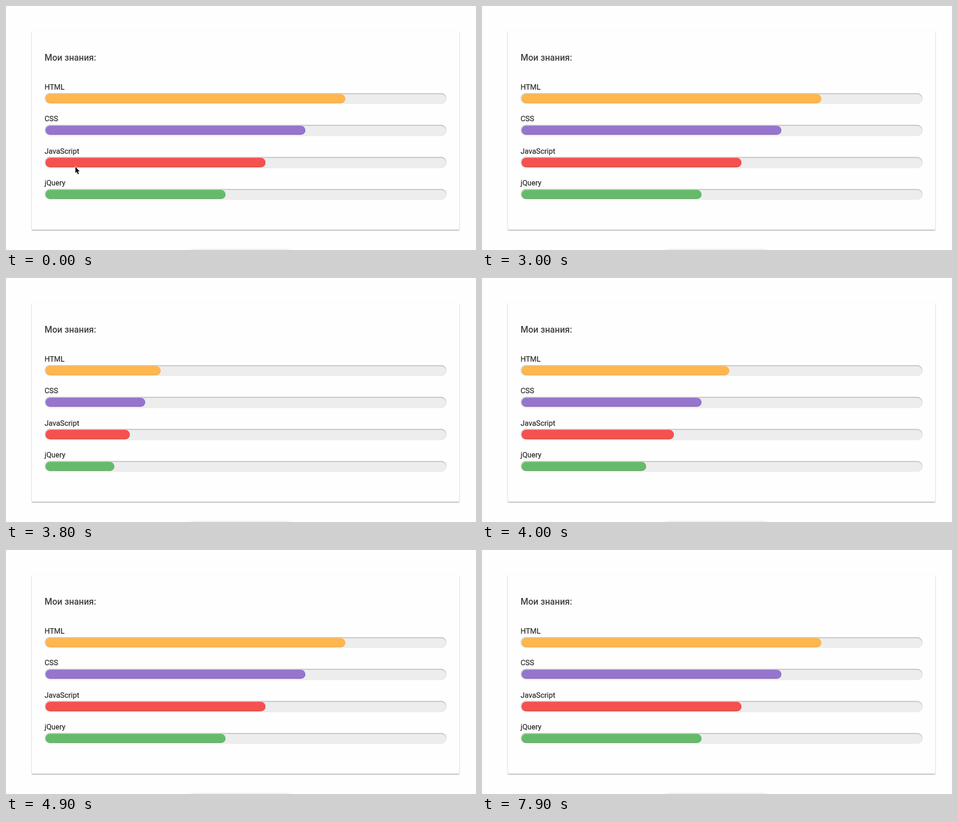
Recreate the animation shown at these times as an HTML page. Size 1036x540 px, loop 8 s.

```html
<!DOCTYPE html>
<html lang="ru">
<head>
<meta charset="utf-8">
<title>Мои знания</title>
<style>
  html, body { margin: 0; width: 100%; height: 100%; overflow: hidden; background: #fefefe; }
  body { position: relative; font-family: Roboto, sans-serif; color: #2b2b2b; }
  body *, .track { position: absolute; box-sizing: border-box; }
  .card {
    left: 57px; top: 55px; width: 942px; height: 440px; background: #fefefe;
    box-shadow: 0 1px 3px rgba(0,0,0,.12), 0 1.5px 2px rgba(0,0,0,.24);
  }
  h1 { left: 85px; top: 103px; margin: 0; font-size: 19.4px; line-height: 24px; font-weight: 500; color: #424242; white-space: nowrap; }
  .track {
    left: 85px; width: 886px; height: 24.5px; border-radius: 12.25px; background: #ededed;
    box-shadow: inset 0 1.5px 2px rgba(0,0,0,.25);
  }
  .label {
    left: 0; top: -24.6px; font-size: 16.3px; line-height: 24px; white-space: nowrap;
    -webkit-text-stroke: .25px #2b2b2b;
  }
  .fill {
    left: 1.5px; top: 1.75px; height: 20.5px; border-radius: 10.25px;
    box-shadow: inset 0 -1px 1px rgba(0,0,0,.15);
  }
  .pill { left: 393px; top: 537px; width: 249px; height: 44px; border-radius: 22px; background: #f3f3f3; }
  #cursor { left: 150px; top: 352px; }
</style>
</head>
<body>
<div class="card"></div>
<h1>Мои знания:</h1>
<div class="pill"></div>
<svg id="cursor" width="16" height="26" viewBox="150 352 16 26">
  <path d="M153 355.7V369.6L156 366.8L158.3 372.2L160.6 371.2L158.3 366H162.2Z"
        fill="#000" stroke="#fff" stroke-width="1.6" paint-order="stroke"/>
</svg>
<script>
  const LOOP = 8000, STEP = 100;
  const RESET = 3500, START = 3374, DURATION = 1000, CURSOR_END = 600;
  const INNER = 882.5;
  const skills = [
    { name: 'HTML', level: .75, color: '#ffb64d', top: 192.75 },
    { name: 'CSS', level: .65, color: '#9575cd', top: 263 },
    { name: 'JavaScript', level: .55, color: '#f4514f', top: 334.25 },
    { name: 'jQuery', level: .45, color: '#66bb6a', top: 404.75 }
  ];
  const cursor = document.getElementById('cursor');

  function add(parent, className, text = '') {
    const el = document.createElement('div');
    el.className = className;
    el.textContent = text;
    parent.append(el);
    return el;
  }

  for (const skill of skills) {
    const track = add(document.body, 'track');
    track.style.top = skill.top + 'px';
    add(track, 'label', skill.name);
    skill.fill = add(track, 'fill');
    skill.fill.style.background = skill.color;
  }
  document.body.append(cursor);

  const swing = x => .5 - Math.cos(Math.PI * x) / 2;

  function draw(time) {
    const t = Math.floor(time % LOOP / STEP) * STEP;
    const p = t < RESET ? 1 : swing(Math.min(1, (t - START) / DURATION));
    for (const { fill, level } of skills) fill.style.width = INNER * level * p + 'px';
    cursor.style.visibility = t < CURSOR_END ? 'visible' : 'hidden';
  }

  const origin = performance.now();
  function tick() {
    draw(performance.now() - origin);
    requestAnimationFrame(tick);
  }
  tick();
</script>
</body>
</html>
```
